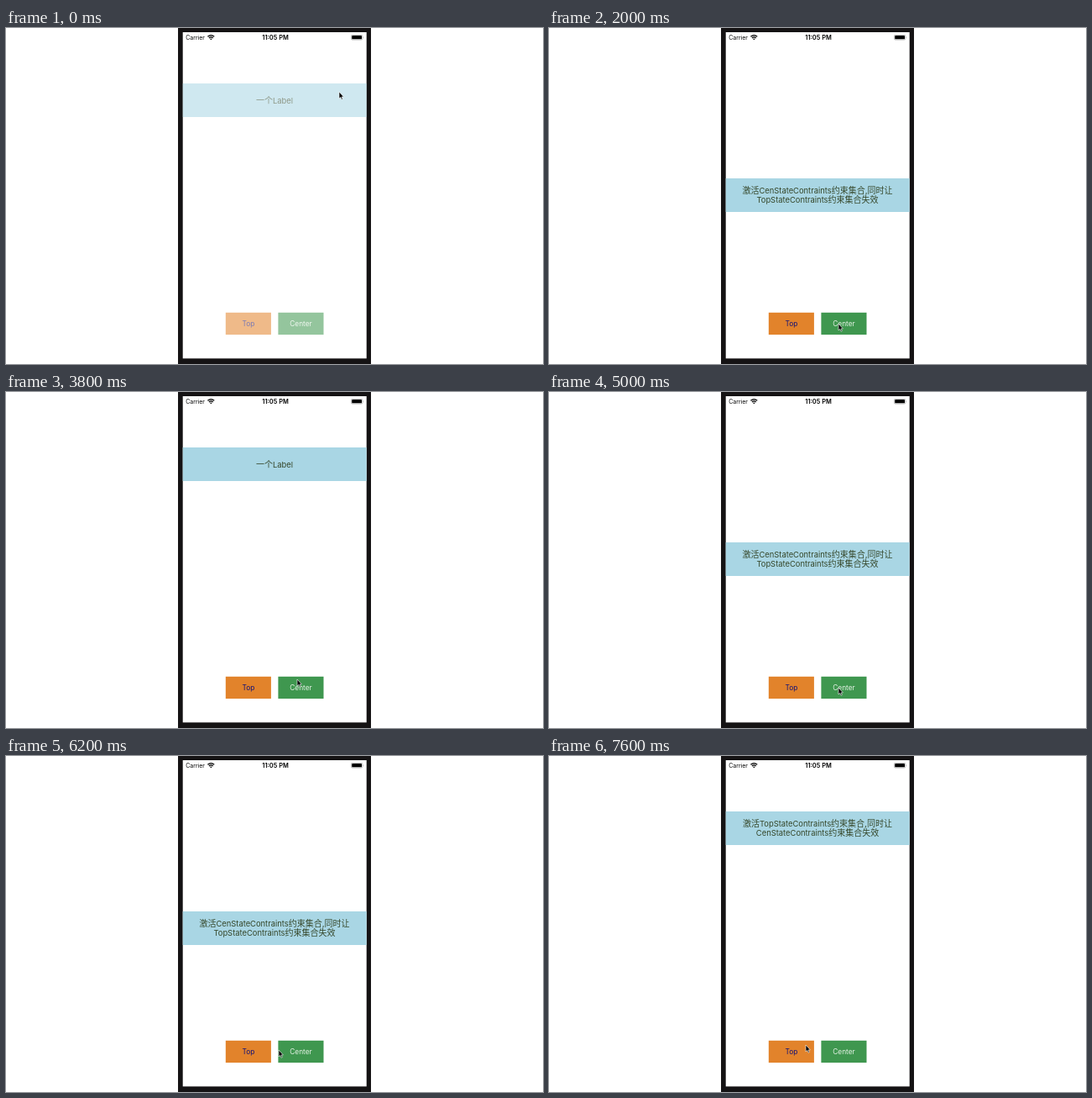
Recreate the animation shown at these times as an HTML page. Size 640x400 px, loop 7800 ms.

```html
<!DOCTYPE html>
<html lang="zh-CN">
<head>
<meta charset="utf-8">
<style>
html, body { margin: 0; width: 100%; height: 100%; overflow: hidden; background: #fff; }
svg { display: block; width: 640px; height: 400px; }
text { font-family: Inter, "Noto Sans CJK SC", "Noto Sans CJK", sans-serif; }
.status { font-size: 6.9px; }
.button { font-size: 8.3px; text-anchor: middle; }
#label text { font-size: 10px; text-anchor: middle; fill: #35472a; }
#label .latin { font-size: 9.4px; }
</style>
</head>
<body>
<svg viewBox="0 0 640 400">
  <rect x="205" width="230" height="400" fill="#151314"/>
  <rect x="210.7" y="5" width="219" height="388.4" fill="#fff"/>

  <text class="status" x="214.3" y="13.6">Carrier</text>
  <path d="M240.4 10.3Q244.3 6.9 248.2 10.3M241.9 11.9Q244.3 9.8 246.7 11.9"
        fill="none" stroke="#000" stroke-width="1.3"/>
  <path d="M243 13L244.3 14.3L245.6 13Q244.3 11.9 243 13Z"/>
  <text x="321" y="13.6" font-size="7.4" font-weight="600" text-anchor="middle">11:05 PM</text>
  <rect x="411.3" y="8.3" width="13.6" height="5.8" rx="1.6" fill="none" stroke="#999" stroke-width=".6"/>
  <rect x="412.2" y="9.1" width="11.8" height="4.2" rx=".9"/>
  <path d="M425.6 10.2Q426.8 11.2 425.6 12.2Z" fill="#999"/>

  <g id="app">
    <g id="label">
      <rect x="210.7" width="219" height="40" fill="#a9d6e4"/>
      <text id="one" x="320" y="23.8">一个<tspan class="latin">Label</tspan></text>
      <g id="two">
        <text x="320" y="17.8">激活<tspan class="latin" id="on"></tspan>约束集合,同时让</text>
        <text x="320" y="29.4"><tspan class="latin" id="off"></tspan>约束集合失效</text>
      </g>
    </g>
    <rect x="261.8" y="338.8" width="54.1" height="26.3" fill="#e2832b"/>
    <text class="button" x="288.9" y="355.2" fill="#10107a">Top</text>
    <rect x="324.4" y="338.8" width="54.1" height="26.3" fill="#3f974f"/>
    <text class="button" x="351.5" y="355.2" fill="#e6f3e6">Center</text>
  </g>

  <path id="cursor" d="M0 0V8L1.8 6.4L3 9.2L4.3 8.6L3.1 5.9H5.4Z"
        stroke="#fff" stroke-width=".6" stroke-linejoin="round"/>
</svg>
<script>
const $ = id => document.getElementById(id);
const LOOP = 7800, STEP = 200, RELAUNCH = 3000;
const TOP = 66, CENTER = 179;

// Presses after launch, alternating between Center and Top
const presses = [1335, 2463, 2935, 3750];

// Pointer stops: time, x, y
const stops = [
  [0, 397, 76], [800, 347, 342], [2000, 345, 352], [2400, 307, 347], [2600, 354, 348],
  [3200, 325, 350], [3400, 306, 346], [4400, 303, 348], [4600, 306, 344]
];

function pointer(t) {
  const i = stops.findIndex(s => s[0] > t);
  if (i < 0) return stops[stops.length - 1].slice(1);
  const [t0, x0, y0] = stops[i - 1], [t1, x1, y1] = stops[i];
  const k = (t - t0) / (t1 - t0);
  return [x0 + (x1 - x0) * k, y0 + (y1 - y0) * k].map(Math.round);
}

// Remaining distance (1 to 0) of a lightly damped spring
function spring(ms) {
  const w = 0.0165, damp = 0.69, a = w * damp, f = w * Math.sqrt(1 - damp * damp);
  return Math.exp(-a * ms) * (Math.cos(f * ms) + a / f * Math.sin(f * ms));
}

function draw(time) {
  let t = Math.floor(time % LOOP / STEP) * STEP;
  if (t >= RELAUNCH) t -= RELAUNCH;

  const count = presses.filter(p => p <= t).length;
  const centered = count % 2 === 1;
  let y = TOP;
  if (count) {
    const [from, to] = centered ? [TOP, CENTER] : [CENTER, TOP];
    y = Math.max(TOP, Math.round(to + (from - to) * spring(t - presses[count - 1])));
  }
  $("on").textContent = (centered ? "Cen" : "Top") + "StateContraints";
  $("off").textContent = (centered ? "Top" : "Cen") + "StateContraints";
  $("one").style.display = count ? "none" : "";
  $("two").style.display = count ? "" : "none";
  $("app").style.opacity = t < STEP ? 0.56 : 1;
  $("label").setAttribute("transform", `translate(0 ${y})`);
  $("cursor").setAttribute("transform", `translate(${pointer(t)})`);
}

const start = performance.now();
function frame() {
  draw(performance.now() - start);
  requestAnimationFrame(frame);
}
frame();
</script>
</body>
</html>
```
